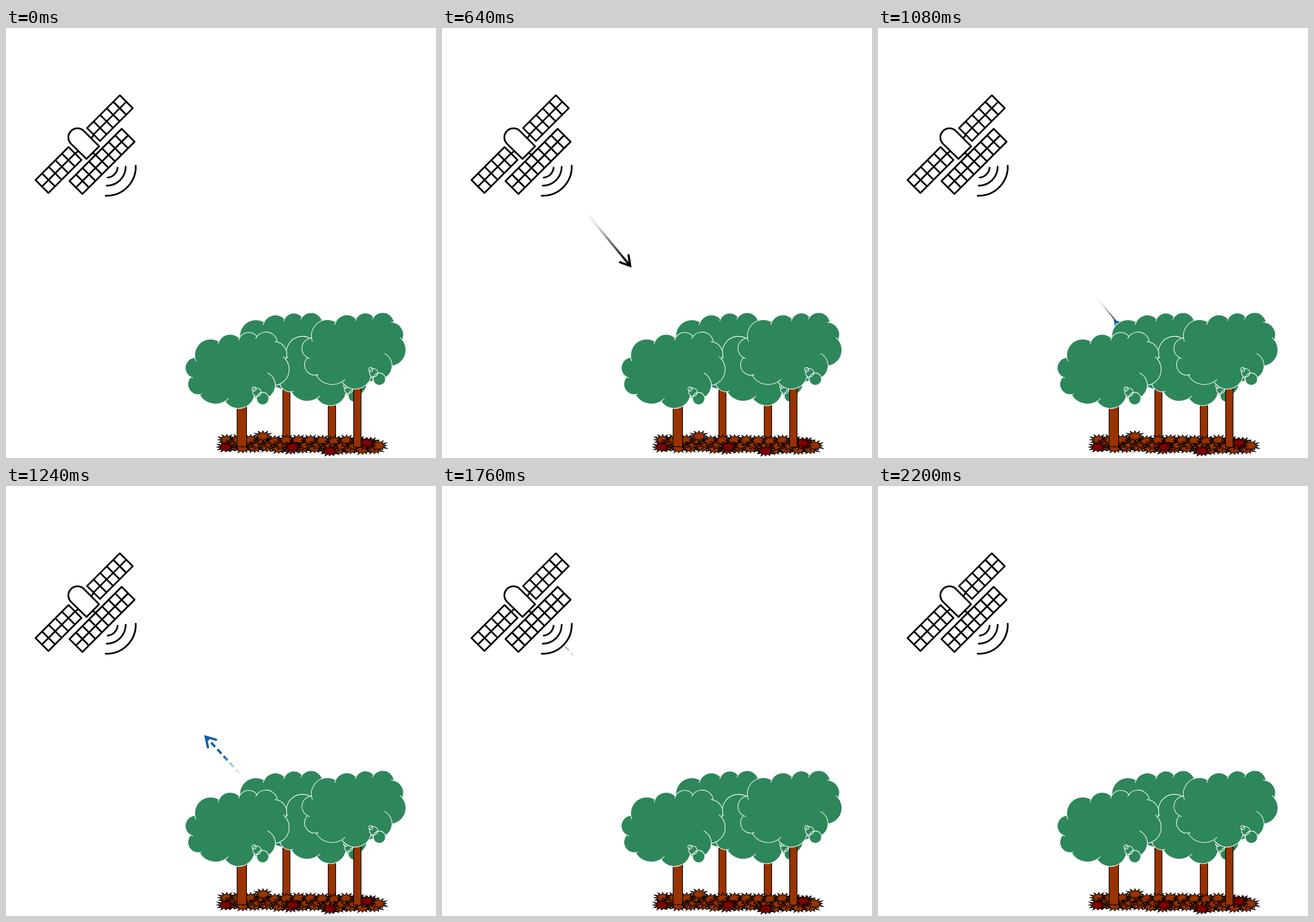
Recreate the animation shown at these times as an HTML page with a canvas. Size 748 by 748 pixels, loop 2.24 s.

```html
<!DOCTYPE html>
<html>
<head>
<meta charset="utf-8">
<title>Satellite signal over a forest</title>
<style>
html, body { margin: 0; width: 100%; height: 100%; overflow: hidden; background: #fff; }
canvas { display: block; }
</style>
</head>
<body>
<canvas id="stage" width="748" height="748"></canvas>
<script>
const ctx = document.getElementById('stage').getContext('2d');
const LOOP = 2240, STEP = 40, ZOOM = 370, RAD = Math.PI / 180;
const GREEN = '#2d875a', BROWN = '#993300', MAROON = '#800000';

let seed = 7;
function random() {
  seed = seed * 16807 % 2147483647;
  return seed / 2147483647;
}

function paint(path, fill, stroke, width = 1) {
  ctx.lineWidth = width;
  if (fill) { ctx.fillStyle = fill; ctx.fill(path); }
  if (stroke) { ctx.strokeStyle = stroke; ctx.stroke(path); }
}

function at(x, y, drawPart) {
  ctx.save();
  ctx.translate(x, y);
  drawPart();
  ctx.restore();
}

// Where each lobe of the cloud starts, its radius, and how far (degrees) its line folds inwards.
const LOBES = [
  [16, 43.7, 28], [58, 15.6, 22], [93.5, 10, 18], [124, 7, 20], [159.6, 16.6, 22], [174, 46.8, 28],
  [156, 92, 24, 64], [119, 112, 28], [68.7, 119.6, 32], [24, 108, 18], [9, 77.6, 18]
];

const cloud = new Path2D(), folds = new Path2D();
LOBES.forEach(([x, y, r, fold = 13], i) => {
  const [nextX, nextY] = LOBES[(i + 1) % LOBES.length];
  const dx = nextX - x, dy = nextY - y, chord = Math.hypot(dx, dy);
  const k = Math.sqrt(r * r - chord * chord / 4) / chord;
  const cx = x + dx / 2 - dy * k, cy = y + dy / 2 + dx * k;
  const from = Math.atan2(y - cy, x - cx), inner = from - fold * RAD;
  cloud.arc(cx, cy, r, from, Math.atan2(nextY - cy, nextX - cx));
  folds.moveTo(cx + r * Math.cos(inner), cy + r * Math.sin(inner));
  folds.arc(cx, cy, r, inner, from);
});
cloud.closePath();

const bubbles = new Path2D();
for (const [x, y, r] of [[134, 115, 10.7], [124, 104, 7.3], [119, 98.5, 3.7]]) {
  bubbles.moveTo(x + r, y);
  bubbles.arc(x, y, r, 0, 7);
}

function tree(x, y, trunkX, trunkWidth, trunkBottom) {
  const trunk = new Path2D();
  trunk.rect(trunkX, y + 100, trunkWidth, trunkBottom - y - 100);
  paint(trunk, BROWN, '#000', 1.2);
  at(x, y, () => {
    paint(cloud, GREEN, '#fff', 1.1);
    paint(folds, null, '#fff', 1.1);
    paint(bubbles, GREEN, '#fff', 1.1);
  });
}

// A ragged star of twelve spikes
const leaf = new Path2D();
for (let i = 0; i < 24; i++) {
  const r = i % 2 ? 0.55 : 0.85 + 0.25 * random();
  leaf.lineTo(16 * r * Math.cos(i * 15 * RAD), 9.5 * r * Math.sin(i * 15 * RAD));
}
leaf.closePath();

// Leaves in three rows, the ground falling slightly to the right
const leaves = [];
for (let i = 0; i < 39; i++) {
  const x = 384 + 264 * i / 38;
  leaves.push([x, 715 + 7 * (i * 2 % 3) + 5 * i / 38 + 4 * (random() - 0.5)]);
}
leaves.push([447, 710]);
const darkLeaves = [[382, 729], [498, 729], [563, 736], [628, 722]];

function scatter(list, color) {
  for (const [x, y] of list) at(x, y, () => paint(leaf, color, '#000', 1.1));
}

function forest() {
  ctx.lineJoin = 'miter';
  ctx.lineCap = 'butt';
  tree(391, 496, 481.5, 12.5, 715);
  tree(472, 524.7, 560.5, 13, 720);
  scatter(leaves, BROWN);
  scatter(darkLeaves, MAROON);
  tree(312.5, 529.6, 402, 16.5, 728);
  tree(515.5, 495.8, 604.7, 13, 729);
}

// A panel two cells wide, running up to the right from its left corner
function panel(x, y, length, cells) {
  const path = new Path2D(), side = 22.5;
  const line = (u1, v1, u2, v2) => {
    path.moveTo(x + u1 + v1, y - u1 + v1);
    path.lineTo(x + u2 + v2, y - u2 + v2);
  };
  for (let i = 0; i <= 2; i++) line(0, side * i / 2, length, side * i / 2);
  for (let i = 0; i <= cells; i++) line(length * i / cells, 0, length * i / cells, side);
  paint(path, null, '#000', 3);
}

function satellite() {
  const waveX = 175.2, waveY = 241.3, waveR = 50.5;
  // White backing hides the arrows until they pass the outer wave.
  ctx.fillStyle = '#fff';
  ctx.fillRect(40, 100, 150, 150);
  ctx.beginPath();
  ctx.arc(waveX, waveY, waveR, 0, 7);
  ctx.fill();

  ctx.lineCap = ctx.lineJoin = 'round';
  panel(141, 174, 57, 5);
  panel(51.3, 264.5, 57.5, 5);
  panel(110.4, 266.2, 90.8, 8);

  const body = new Path2D();
  body.arc(124.3, 190.3, 15.8, 135 * RAD, 315 * RAD);
  body.lineTo(162, 205.8);
  body.lineTo(140, 227.8);
  body.closePath();
  paint(body, '#fff', '#000', 3);
  paint(new Path2D('M148.5 191.5L152.5 186M126 214L120 218.5M151 217L156 221'), null, '#000', 3);

  for (const [r, trim] of [[19, 5], [33, 0], [waveR, -2]]) {
    const wave = new Path2D();
    wave.arc(waveX, waveY, r, trim * RAD, (90 - trim) * RAD);
    paint(wave, null, '#000', 3);
  }
}

// Moves steadily, growing at the start of its flight and shrinking at the end
function arrow(t, a) {
  const scale = Math.min(1, (t - a.start) / ZOOM, (a.end - t) / ZOOM);
  if (scale <= 0) return;
  const half = a.length / 2, tip = half - 3.8, back = half - 20;
  const shade = ctx.createLinearGradient(-half, 0, half, 0);
  a.stops.forEach(([pos, color]) => shade.addColorStop(pos, color));
  at(a.x + a.vx * (t - a.at), a.y + a.vy * (t - a.at), () => {
    ctx.rotate(a.angle * RAD);
    ctx.scale(scale, scale);
    ctx.lineCap = 'butt';
    ctx.lineJoin = 'miter';
    ctx.setLineDash(a.dash);
    paint(new Path2D(`M${-half} 0H${half - 5}`), null, shade, a.width);
    ctx.setLineDash([]);
    ctx.lineCap = 'round';
    paint(new Path2D(`M${back} -9.7L${tip} 0L${back} 9.7`), null, a.color, a.width);
  });
}

const DOWN = {
  start: 80, end: 1310, at: 640, x: 290, y: 368.5, vx: 0.26, vy: 0.295,
  angle: 50.5, length: 125, width: 3.9, dash: [], color: '#000',
  stops: [[0, '#0000'], [0.25, '#0002'], [0.9, '#000']]
};
const UP = {
  start: 850, end: 2084, at: 1240, x: 376, y: 467, vx: -0.333, vy: -0.385,
  angle: 227.2, length: 92, width: 4, dash: [10, 6], color: '#0b5fa8',
  stops: [[0, '#eef5ee'], [0.08, '#d6e9e4'], [0.25, '#a5c8de'], [0.45, '#0b5fa8']]
};

function draw(t) {
  ctx.fillStyle = '#fff';
  ctx.fillRect(0, 0, 748, 748);
  arrow(t, DOWN);
  arrow(t, UP);
  satellite();
  forest();
}

const begin = performance.now();
function tick() {
  const t = (performance.now() - begin) % LOOP;
  draw(Math.floor(t / STEP) * STEP);
  requestAnimationFrame(tick);
}
tick();
</script>
</body>
</html>
```
